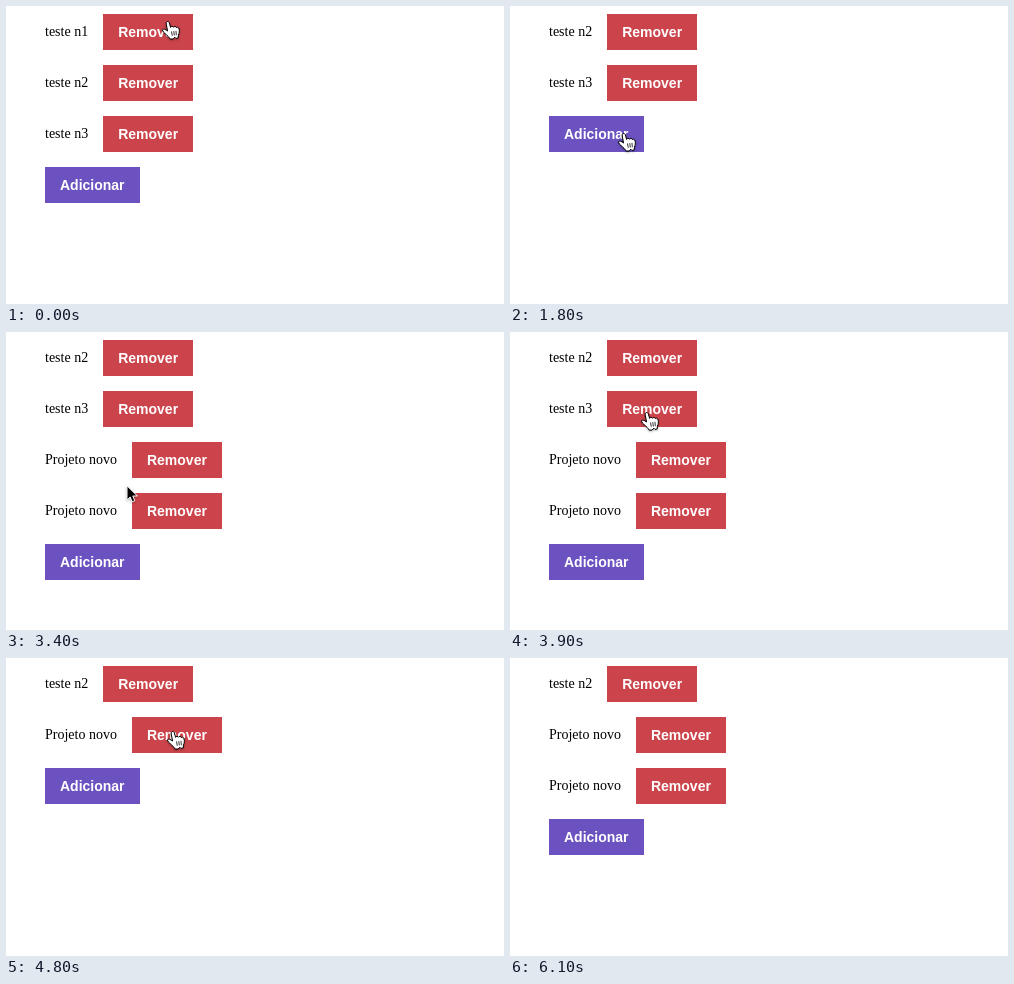
An HTML page that plays this animation: 498 px wide and 298 px high, repeating every 6700 ms.

```html
<!DOCTYPE html>
<html lang="pt">
<head>
<meta charset="utf-8">
<style>
html, body { margin: 0; width: 100%; height: 100%; overflow: hidden; background: #fff; }
ul { position: absolute; left: 39px; top: 7px; margin: 0; padding: 0; list-style: none; }
li { display: flex; align-items: baseline; gap: 15px; height: 36px; margin-bottom: 15px;
  font: 14px "Liberation Serif", "Times New Roman", serif; color: #000; white-space: pre; }
b { position: relative; top: 1px; padding: 10px 15px; background: #cc444b; color: #fff;
  font: bold 14px/16px "Liberation Sans", Arial, sans-serif; }
.add { background: #6b52c0; }
svg { position: absolute; left: 0; top: 0; width: 30px; height: 30px; overflow: visible;
  filter: drop-shadow(0 1px 1px rgba(0, 0, 0, .3)); }
path { stroke-linejoin: round; stroke-linecap: round; }
</style>
</head>
<body>
<ul></ul>
<svg>
  <g id="hand" fill="#fff" stroke="#000" transform="translate(-6 -1)">
    <path d="M9 18.8C8.2 16.8 6.2 15.8 4.8 14.2 3.4 12.6 1.4 11.4 1.5 10 1.7 8.7 4 8.8 6.6 11L5.2 4C4.7 1.2 7.8.6 8.4 3L9.6 7.4C10 6 12 6 12.5 7.3 13.1 6 15 6.2 15.4 7.6 16.4 6.7 17.8 7.3 18.1 9 18.6 11.5 18.3 13 17.4 15.2L17.2 18 15 18.4 13.8 17.2 12.4 18.8Z"/>
    <path fill="none" stroke-width=".8" d="M10.6 11.8l.6 3.6M12.8 11.5l.5 3.6M15 11.2l.3 3.6"/>
  </g>
  <path id="arrow" stroke="#fff" d="M0 0V14L3.2 11 5.2 15.8 7.8 14.7 5.8 10H10Z"/>
</svg>
<script>
const LOOP = 6700, STEP = 100, TOP = 8, PITCH = 51, HEIGHT = 36;
const NEW = 'Projeto novo';

// pointer moves: start, end, x, y, time of the click that follows
const moves = [
  [100, 300, 158, 5],
  [400, 600, 165, 21, 1000],
  [1200, 1800, 113, 127, 2100],
  [2400, 2600, 110, 159],
  [2700, 2900, 115, 175, 3200],
  [3300, 3600, 138, 94],
  [3700, 3900, 136, 80, 4200],
  [4200, 4600, 166, 73, 4800],
  [4800, 5300, 113, 132, 5500],
  [5600, 6100, 101, -12]
];

const list = document.querySelector('ul');
const pointer = document.querySelector('svg');
const hand = document.getElementById('hand');
const arrow = document.getElementById('arrow');

const ease = k => k * k * (3 - 2 * k);
const rowAt = y => Math.floor((y - TOP) / PITCH);
const show = (el, on) => { el.style.display = on ? '' : 'none'; };

function overButton(x, y, items) {
  const row = rowAt(y);
  if (row < 0 || row > items.length || y - TOP - row * PITCH >= HEIGHT) return false;
  const [left, width] = row === items.length ? [39, 95] : [items[row] === NEW ? 126 : 97, 90];
  return x >= left && x < left + width;
}

// a click on a row removes it, a click below the last row adds one
function click(items, y) {
  const row = rowAt(y);
  return row === items.length ? [...items, NEW] : items.filter((_, i) => i !== row);
}

// the pointer changes shape only while it moves
function sceneAt(t) {
  let items = ['teste n1', 'teste n2', 'teste n3'], x = 161, y = 15, over = true;
  for (const [start, end, toX, toY, clickAt] of moves) {
    if (t < start) break;
    const e = ease(Math.min(1, (t - start) / (end - start)));
    x = Math.round(x + (toX - x) * e);
    y = Math.round(y + (toY - y) * e);
    over = overButton(x, y, items);
    if (t >= clickAt) items = click(items, y);
  }
  return { items, x, y, over };
}

let shown;
function drawList(items) {
  const html = items.map(s => `<li>${s}<b>Remover</b></li>`).join('') +
    '<li><b class="add">Adicionar</b></li>';
  if (html !== shown) list.innerHTML = shown = html;
}

function frame() {
  const t = Math.floor(performance.now() % LOOP / STEP) * STEP;
  const { items, x, y, over } = sceneAt(t);
  drawList(items);
  show(hand, over);
  show(arrow, !over);
  show(pointer, y > -12);
  pointer.style.transform = `translate(${x}px, ${y}px)`;
  requestAnimationFrame(frame);
}
frame();
</script>
</body>
</html>
```
